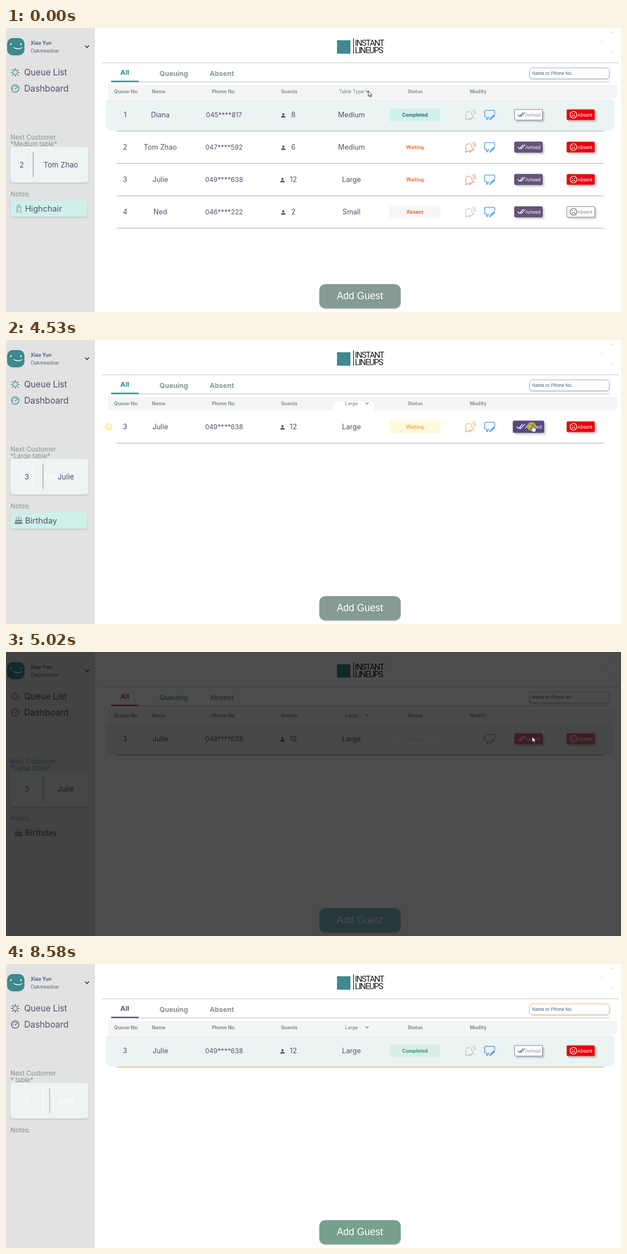
An HTML page for the animation above (9360 ms loop, 1100 by 509 pixels).

```html
<!DOCTYPE html>
<html lang="en">
<head>
<meta charset="utf-8">
<title>Queue list</title>
<style>
html, body { margin: 0; width: 100%; height: 100%; overflow: hidden; background: #fff; }
svg { display: block; width: 1100px; height: 509px; font-family: Inter, sans-serif; font-feature-settings: "calt" 0; }
.arial { font-family: "Liberation Sans", Arial, sans-serif; }
.lato { font-family: Lato, sans-serif; }
.brand { font-family: Roboto, sans-serif; letter-spacing: -1.4px; }
.raised { filter: drop-shadow(3px 3px 1.2px rgba(0,0,0,.17)); }
.soft { filter: drop-shadow(.5px 1px .8px rgba(0,0,0,.2)); }
.deep { filter: drop-shadow(0 8px 9px rgba(0,0,0,.35)); }
.line { fill: none; stroke-linecap: round; stroke-linejoin: round; }
</style>
</head>
<body>
<svg viewBox="0 0 1100 509">
  <g id="page"></g>
  <rect id="shade" width="1100" height="509"/>
  <g id="dialog"></g>
  <g id="menu"></g>
  <g id="click">
    <circle cx="940" cy="155" r="8" fill="#c3bd22" opacity=".85"/>
    <circle cx="184" cy="155.5" r="5.3" fill="none" stroke="#efe04a" stroke-width="1.3"/>
    <path d="M184 154.5v4M184 152v1" stroke="#efe04a" stroke-width="1.3"/>
  </g>
  <path id="arrow" d="M0 0V9.6L2.3 7.6 4 11.2 5.5 10.5 3.9 7H7Z" fill="#fff" stroke="#222" stroke-width=".9"/>
  <path id="hand" d="M0 1Q1 -.5 2 1V5L6.5 6Q7.5 6.5 7 9L6 13H1L-3 8Q-3 6.5 -1.5 7L0 8Z" fill="#fff" stroke="#222" stroke-width=".9"/>
</svg>
<script>
const LOOP = 9360;
const $ = id => document.getElementById(id);

const base = {
  ink: '#574d6d', muted: '#82958f', tab: '#859992', accent: '#3b888b', add: '#869b94', arrived: '#655279',
  bell: '#e67a4d', edit: '#58a9f2', waiting: '#e8743f', waitingBg: 'none', doneBg: '#cff1e9', doneInk: '#2d6f70',
  absent: '#e60012', rule: '#c6c6c6', split: '#9a9a9a', chip: '#cef0e8', side: '#e2e2e2', search: '#a9b5b8', hint: '#3e6482'
};
const dim = {
  ...base, ink: '#484f5f', muted: '#6f7e79', tab: '#7a8d85', accent: '#474f69', add: '#7b9a94', arrived: '#5b6585',
  bell: '#a5aaa9', edit: '#4d8071', waiting: '#b5b5b5', split: '#b29a98', chip: '#c4e0db', rule: '#a9aaaa', hint: '#4a5560'
};
const back = {
  ...base, ink: '#50576a', muted: '#8a8a8c', tab: '#8c8c8e', add: '#77a08f', accent: '#555c70', bell: '#e9b170',
  edit: '#619fd9', waiting: '#e9b170', waitingBg: '#f6f6f6', doneBg: '#daeee8', doneInk: '#389678',
  rule: '#e9bd83', split: '#e6b878', chip: 'none', search: '#e9bd83'
};
const themes = {
  list: base,
  large: { ...base, ink: '#524d66', arrived: '#564981', bell: '#f0a343', waiting: '#f2b04f', waitingBg: '#fff9dc' },
  dim,
  dark: {
    ...dim, ink: '#5c4c55', muted: '#7799a0', tab: '#87a0a8', accent: '#b8455f', add: '#82bcc4', arrived: '#d65f80',
    absent: '#d65f80', edit: '#a0a5a5', bell: '#e0e4e4', waiting: '#d8d8d8', waitingBg: '#f4f4f4', chip: 'none'
  },
  back,
  done: back
};

const phases = [[0, 'list'], [2000, 'large'], [4630, 'dim'], [4890, 'dark'], [6720, 'back'], [6930, 'done']];
const shades = [[0, 0], [4630, .12], [4770, .4], [4890, .57], [5020, .7], [6600, .5], [6720, .2], [6830, 0]];
const dialogs = [[0, 0], [5160, .3], [5280, .6], [5400, .85], [5520, 1], [6600, .7], [6720, .25], [6830, 0]];
const menus = [[0, -1], [360, 0], [1460, 1], [1620, 2], [2000, -1]];
const pointer = [
  [0, 648, 113], [1000, 645, 114], [1120, 639, 118], [1240, 633, 120], [1380, 632, 130], [1460, 632, 146],
  [1620, 631, 150], [1760, 631, 153], [1850, 630, 156], [2730, 695, 161], [2900, 735, 162], [2990, 773, 163],
  [3150, 832, 163], [3240, 896, 160], [3400, 925, 157], [3510, 938, 154], [3620, 941, 152], [5520, 936, 157],
  [5670, 875, 197], [5780, 812, 234], [5910, 745, 262], [6030, 690, 274], [6160, 658, 277], [6330, 655, 274],
  [6600, 653, 278], [7810, 701, 289], [7970, 770, 325], [8090, 840, 365], [8215, 915, 405], [8340, 990, 450],
  [8460, 1073, 493], [8580, 1200, 600]
];
const hands = [[0, 0], [1460, 1], [2730, 0], [3620, 1], [4630, 0], [6330, 1], [6600, 0]];
const at = (steps, t) => steps.findLast(s => s[0] <= t);

const text = (x, y, s, size, fill, { anchor = 'middle', weight = 400, cls = '' } = {}) =>
  `<text x="${x}" y="${y}" font-size="${size}" fill="${fill}" text-anchor="${anchor}" font-weight="${weight}" class="${cls}">${s}</text>`;
const left = (x, y, s, size, fill, opt) => text(x, y, s, size, fill, { ...opt, anchor: 'start' });
const rect = (x, y, w, h, r, fill, more = '') =>
  `<rect x="${x}" y="${y}" width="${w}" height="${h}" rx="${r}" fill="${fill}" ${more}/>`;
const path = (d, color, width = 1, more = '') =>
  `<path class="line" d="${d}" stroke="${color}" stroke-width="${width}" ${more}/>`;
const place = (x, y, body, more = '') => `<g transform="translate(${x} ${y}) ${more}">${body}</g>`;

const rows = [
  ['1', 'Diana', '045****817', 8, 'Medium', 'Completed'],
  ['2', 'Tom Zhao', '047****592', 6, 'Medium', 'Waiting'],
  ['3', 'Julie', '049****638', 12, 'Large', 'Waiting'],
  ['4', 'Ned', '046****222', 2, 'Small', 'Absent']
];

const person = (x, y, c) => place(x, y, `<circle cy="-2" r="2" fill="${c}"/><path d="M-4 4Q-4 .8 0 .8T4 4Z" fill="${c}"/>`);

const bell = (x, y, c) => place(x, y,
  path('M-8 6Q-5.5 4-5.5-1C-5.5-9 5.5-9 5.5-1Q5.5 4 8 6ZM-2.5 6.5Q0 11 2.5 6.5', c, 1, 'transform="translate(-2 1) rotate(-16)"')
  + path('M4-8Q8-6 7-1M6-10Q11-7 9.5-1', c));

const note = (x, y, c) => place(x, y,
  path('M9-2V-6Q9-8 7-8H-7Q-9-8-9-6V2Q-9 4-7 4H-5V9L-1 4', c, 1.6)
  + path('M3 6L8 1', c, 3.4) + `<path d="M-1 10L0 6L3 9Z" fill="${c}"/>`);

function button(x, y, label, color, filled, big) {
  const c = filled ? '#fff' : '#8a8f98';
  const icon = label === 'Arrived'
    ? path('M-19 0L-16 3L-10-4M-14 2L-13 3L-6-4', filled ? '#fff' : '#666b78', 1.2)
    : `<circle cx="-13" r="6" fill="none" stroke="${filled ? '#fff' : '#666'}" stroke-width="1.2"/>`
      + path('M-16 3Q-13-1-10 3M-15.5-2h1M-11.5-2h1', filled ? '#fff' : '#666', 1.2);
  const edge = filled ? (label === 'Absent' ? '#e2633f' : color) : '#777c85';
  return place(x, y, rect(-25, -9.5, 50, 19, 2, filled ? color : '#fff', `class="raised" stroke="${edge}"`)
    + icon + text(label === 'Arrived' ? 8 : 7.5, 3, label, 8.5, c, { cls: 'arial' }), big ? 'scale(1.1)' : '');
}

function row([no, name, phone, guests, type, status], y, k, phase, hover) {
  const base = y + 4.3, gone = status === 'Absent', done = status === 'Completed';
  const [bg, ink] = done ? [k.doneBg, k.doneInk] : gone ? ['#f6f6f6', '#e2643f'] : [k.waitingBg, k.waiting];
  const cell = (x, s, size = 12.6) => text(x, base, s, size, k.ink);
  return cell(213, no) + cell(276, name) + cell(390, phone, 11.8) + person(guests > 9 ? 494.5 : 496, y + 1, k.ink)
    + cell(514, guests) + cell(618, type)
    + rect(686, y - 11, 91, 22.5, 2, bg) + text(731.5, y + 3, status, 8.6, ink, { weight: 700 })
    + bell(830, y, done || gone ? '#b3b7b7' : k.bell) + note(865, y, k.edit)
    + button(934.5, y, 'Arrived', k.arrived, !done && phase !== 'back', hover)
    + button(1028, y, 'Absent', k.absent, !gone && phase !== 'back')
    + rect(198, y + 28.5, 871, 1.6, 0, k.rule);
}

function sidebar(k, phase) {
  const first = phase === 'list', done = phase === 'done';
  const spokes = [...Array(8).keys()].map(i => path('M0-3.5V-7', k.accent, 1.6, `transform="rotate(${i * 45})"`)).join('');
  const split = (x, c) => rect(x, 223, 1.2, 44, 0, c);
  const next = (no, name, x1, x2, c) => text(x1, 250, no, 13.2, c) + text(x2, 250, name, 13.2, c);
  const tom = c => split(48, c === '#fff' ? c : k.split) + next('2', 'Tom Zhao', 28, 98, c);
  const julie = c => split(65.7, done ? '#fff' : k.split) + next('3', 'Julie', 37, 107, c);
  const card = first ? tom(k.ink)
    : done ? julie('#fff') + split(77.5, '#a5a5a5')
    : (phase === 'large' ? tom('#fff') : '') + julie(k.ink);
  const chair = path('M-3 7V-2H4V7ZM-2-2V-6H2V-2M-1 1V4', '#87a09b', 1.1);
  const cake = '<path d="M-7 7V3H7V7ZM-6 2V-1H6V2Z" fill="#7e8d93"/>' + path('M-4-3V-5M0-3V-6M4-3V-5', '#7e8d93', 1.5);
  const notes = done ? '' : rect(8, 309, 137.5, 29.5, 5, k.chip, k.chip === 'none' ? '' : 'class="soft"')
    + (phase === 'back' ? rect(12, 337.6, 129, 1.2, 0, k.rule) : '')
    + place(22.5, 323, first ? chair : cake) + left(34, 328.5, first ? 'Highchair' : 'Birthday', 14.6, k.ink);
  const kind = first ? '*Medium table*' : done ? '* table*' : '*Large table*';
  return rect(0, 0, 159, 509, 0, k.side)
    + rect(2, 18, 31, 31, 10, phase === 'dim' ? '#66948f' : '#3d898e')
    + '<circle cx="9" cy="29" r="1.4" fill="#fff"/><circle cx="26.5" cy="29" r="1.4" fill="#fff"/>' + path('M14 35Q21 40 29 35', '#fff', 1.3)
    + left(44, 29.5, 'Xiao Yun', 8.7, '#475079', { weight: 600 }) + left(44, 44, 'Oakmeadow', 8.5, '#5d6076')
    + path('M142 32L145 35L148 32', '#222', 1.5)
    + place(16.5, 79.5, spokes) + left(32.5, 84.5, 'Queue List', 15.2, k.ink)
    + place(16.5, 108.5, `<circle r="6.6" fill="none" stroke="${k.accent}" stroke-width="1.4"/>` + path('M0 1L3-2M-4 0h.5M-2-3.5h.5M1-4h.5', k.accent, 1.5))
    + left(32.5, 113.5, 'Dashboard', 15.4, k.ink)
    + left(8, 200, 'Next Customer', 11.5, k.muted) + left(8, 211.5, kind, 11.3, k.muted)
    + rect(8, 213, 139.5, 64, 5, '#edf4f3', 'class="soft"') + card
    + left(8, 302, 'Notes:', 11.5, k.muted) + notes;
}

function drawPage(phase, hover) {
  const k = themes[phase], first = phase === 'list';
  const head = (x, s, weight = 700) => text(x, 117, s, 8.6, k.muted, { weight });
  const tab = (x, y, s, c) => text(x, y, s, 12.3, c, { weight: 700 });
  const list = first ? rows : [phase === 'done' ? [...rows[2].slice(0, 5), 'Completed'] : rows[2]];
  $('page').innerHTML = rect(0, 0, 1100, 509, 0, '#fff') + sidebar(k, phase)
    + rect(592, 22, 24, 24, 0, '#3d898e') + rect(621, 18, 1.2, 28, 0, '#222')
    + left(624, 31.5, 'INSTANT', 15, '#181818', { cls: 'brand' }) + left(624, 45, 'LINEUPS', 15, '#181818', { cls: 'brand' })
    + path('M1081 8H1086M1066 22V28M1081 42H1086', '#dcdcdc')
    + rect(171, 61.2, 925, 2, 0, '#dfdfe2') + rect(188, 95.5, 891, 2, 0, '#d8d8db') + rect(188, 94.5, 49, 2.5, 0, k.accent)
    + tab(212.5, 83.5, 'All', k.accent) + tab(300, 86, 'Queuing', k.tab) + tab(386, 86, 'Absent', k.tab)
    + rect(936.5, 71.5, 142.5, 19.5, 5, '#fff', `class="soft" stroke="${k.search}"`)
    + left(941, 84, 'Name or Phone No.', 8.2, k.hint, { cls: 'arial' })
    + rect(182, 102, 911, 24, 2, '#f5f5f5')
    + (phase === 'large' ? rect(585, 110, 74, 43, 8, '#fff') : '')
    + head(215.5, 'Queue No.') + head(273, 'Name') + head(390, 'Phone No.') + head(506.5, 'Guests')
    + head(618, first ? 'Table Type' : 'Large', 500) + path('M643.5 112.5L645.8 114.8L648 112.5', '#777', 1.2)
    + head(732, 'Status') + head(844.5, 'Modify')
    + (phase === 'large' ? '' : rect(178.5, 127, 910, 57, 9, '#ebf4f3'))
    + list.map((r, i) => row(r, 155.5 + 58 * i, k, phase, hover)).join('')
    + rect(560.5, 459, 145.5, 43.5, 11, k.add, 'class="soft"') + text(633, 486.3, 'Add Guest', 17.5, '#fff', { cls: 'arial' });
}

function drawDialog(hover) {
  const yes = rect(-29, -8.7, 58, 17.4, 8.7, '#7e9b8f') + text(0, 3.6, 'Yes', 10, '#fff', { weight: 600 });
  $('dialog').innerHTML = rect(397.5, 216, 314, 84, 15, '#fff', 'class="deep"')
    + left(418, 231.7, 'Confirm Arrival', 13.2, '#444', { weight: 700, cls: 'lato' })
    + rect(414, 238, 282, 1, 0, '#d5d5d5') + rect(414, 261, 282, 1, 0, '#d5d5d5')
    + left(418, 254, 'Please confirm if the customers have arrived.', 9.6, '#666')
    + text(593.5, 283.3, 'Cancel', 11.3, '#666') + place(659, 279.5, yes, hover ? 'scale(1.08)' : '');
}

function drawMenu(active) {
  $('menu').innerHTML = active < 0 ? '' : rect(590, 119, 66, 47, 4, '#fff', 'class="soft"')
    + ['Small', 'Medium', 'Large'].map((s, i) =>
      rect(594, 120 + i * 15, 59, 14.5, 2, i === active ? '#dcebe8' : '#fff') + text(618, 130.5 + i * 15, s, 8.8, '#7d8f89')).join('');
}

const drawn = {};
function update(name, draw, ...args) {
  const key = args.join();
  if (drawn[name] !== key) { drawn[name] = key; draw(...args); }
}

function frame() {
  const t = performance.now() % LOOP;
  const [, x, y] = at(pointer, t), hand = at(hands, t)[1];
  update('page', drawPage, at(phases, t)[1], t >= 3780 && t < 4630);
  update('dialog', drawDialog, t >= 6330 && t < 6600);
  update('menu', drawMenu, at(menus, t)[1]);
  $('shade').setAttribute('opacity', at(shades, t)[1]);
  $('dialog').setAttribute('opacity', at(dialogs, t)[1]);
  $('click').setAttribute('opacity', +(t >= 4530 && t < 4630));
  for (const [id, on] of [['arrow', !hand], ['hand', hand]]) {
    $(id).setAttribute('transform', `translate(${x} ${y})`);
    $(id).setAttribute('opacity', +on);
  }
  requestAnimationFrame(frame);
}
frame();
</script>
</body>
</html>
```
